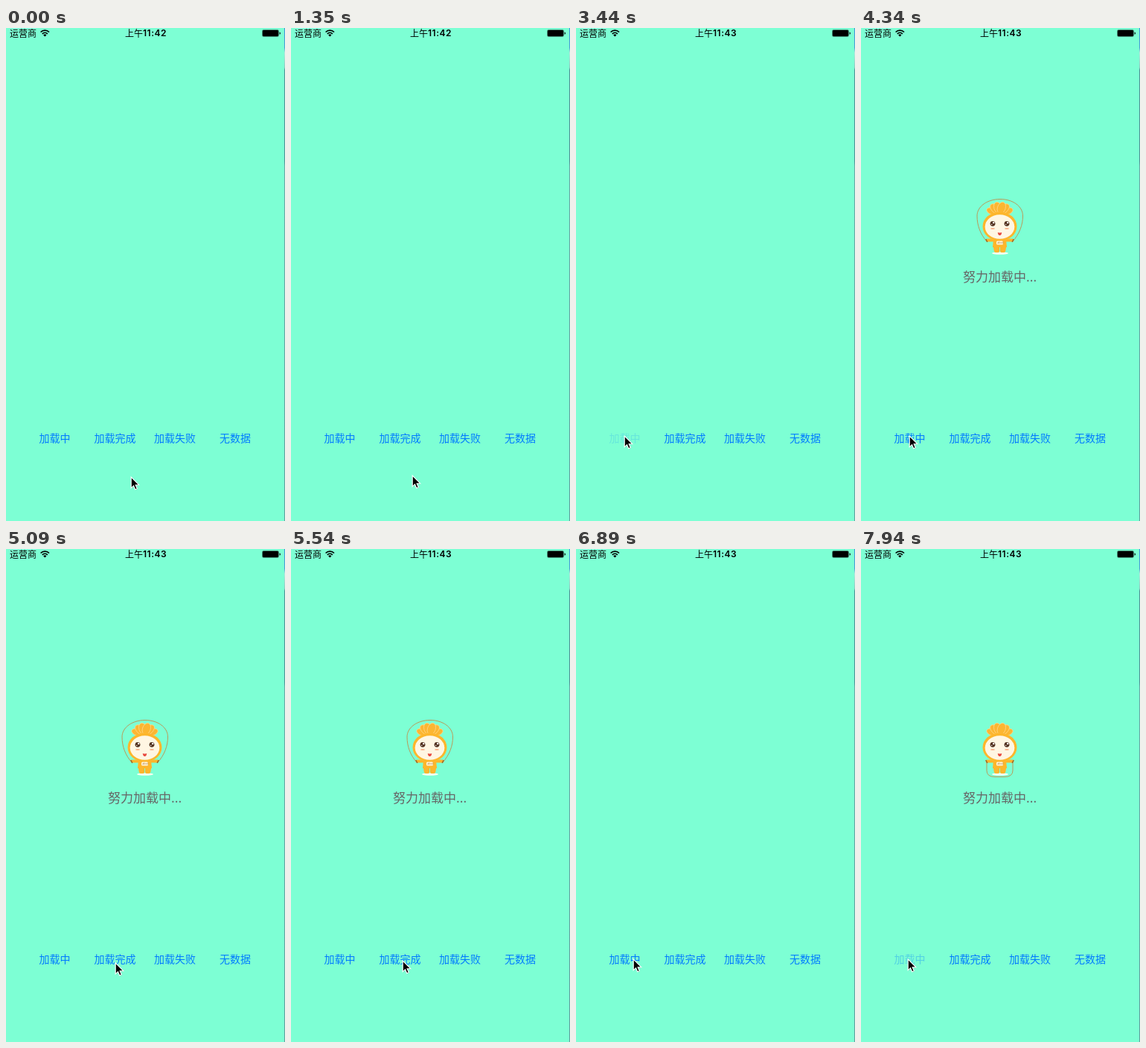
Animation of 375 by 661 pixels, one loop 8 s. Source, as an HTML page:

```html
<!DOCTYPE html>
<html lang="zh">
<head>
<meta charset="utf-8">
<style>
html, body { margin: 0; width: 100%; height: 100%; overflow: hidden; background: #7dffd4; }
svg { display: block; width: 375px; height: 661px; }
text { font-family: "Noto Sans CJK SC", "Noto Sans CJK", sans-serif; }
.btn { font-size: 14px; fill: #007aff; }
.clock { font-size: 12px; font-weight: 500; }
.digits { font: 600 12px Inter, sans-serif; letter-spacing: .5px; }
</style>
</head>
<body>
<svg viewBox="0 0 375 661">
  <defs>
    <linearGradient id="edge" x2="0" y2="1">
      <stop offset="0" stop-color="#3f8fdc"/>
      <stop offset=".04" stop-color="#4a9fd4"/>
      <stop offset=".05" stop-color="#b4e8dc"/>
      <stop offset=".08" stop-color="#8fc8c0"/>
      <stop offset=".085" stop-color="#4f8f94"/>
      <stop offset=".27" stop-color="#4f8f94"/>
      <stop offset=".28" stop-color="#69a5a4"/>
      <stop offset="1" stop-color="#5f9c9c"/>
    </linearGradient>
  </defs>
  <rect width="375" height="661" fill="#7dffd4"/>
  <rect x="374" width="1" height="661" fill="url(#edge)"/>

  <!-- status bar -->
  <text x="5" y="11.6" font-size="12">运营商</text>
  <g fill="none" stroke="#000" stroke-width="1.7">
    <path d="M46.6 5.500a8.200 8.200 0 0 1 11.400 0M48.800 7.900a5 5 0 0 1 7 0"/>
    <path d="M52.3 11.6l-2.1-2.2a3 3 0 0 1 4.200 0z" fill="#000" stroke="none"/>
  </g>
  <text class="clock" x="160" y="11.6">上午</text>
  <text class="digits" id="digits" x="184" y="11.4"></text>
  <rect x="344.5" y="2.5" width="22" height="9" rx="1.8" fill="none" stroke="#000" stroke-opacity=".45"/>
  <rect x="345" y="3" width="21" height="8" rx="1"/>
  <path d="M367.6 5.2q1.4.4 1.4 1.8t-1.4 1.8z"/>

  <g id="loading">
    <ellipse id="shadow" cx="187" fill="#f4fff0"/>
    <path id="rope" fill="none" stroke="#b99a58"/>
    <g id="doll">
      <g id="tuft" fill="#fcb632" stroke="#ffd98a" stroke-width=".8" transform="translate(186.500 249) scale(1 .85)"></g>
      <g fill="#fdb62c">
        <path d="M178 283h17l1 11h-19z"/>
        <path id="legs"/>
        <path d="M179 284.500L169.500 284.500M194 284.500L203.500 284.500" stroke="#fdb62c" stroke-width="4" stroke-linecap="round"/>
      </g>
      <path d="M167.8 283l2 4M205.2 283l-2 4" stroke="#9a6a2c" stroke-width="1.6"/>
      <ellipse cx="186.5" cy="266" rx="23" ry="19.3" fill="#fdb62c"/>
      <ellipse cx="186.5" cy="266.5" rx="19.8" ry="16.3" fill="#fff6e3"/>
      <g id="eyes"></g>
      <path d="M183.8 274q2.700 1 5.400 0q-.3 4-2.700 4t-2.700-4z" fill="#e8473f"/>
      <rect x="182" y="285.5" width="9" height="5" rx="1.5" fill="#fff4dc"/>
      <text id="badge" x="183.3" y="289.4" font-size="3.6" fill="#a8742c">abcd</text>
    </g>
    <text x="137" y="339.5" font-size="17" fill="#666">努力加载中...</text>
  </g>

  <g class="btn">
    <text id="start" x="44.5" y="554.8">加载中</text>
    <text id="done" x="118.5" y="554.8">加载完成</text>
    <text x="199" y="554.8">加载失败</text>
    <text x="287" y="554.8">无数据</text>
  </g>

  <g id="cursor">
    <path d="M1 1.500V15.500l3.200-3 2.300 5 2.600-1.100-2.200-4.900h4.600z" opacity=".18"/>
    <path d="M.2 0V14.800l3.300-3.100 2.200 5.100 2.600-1.100-2.200-5h4.600z" stroke="#fff" stroke-width="1.1"/>
  </g>
</svg>
<script>
const $ = id => document.getElementById(id);
const set = (id, attrs) => {
  for (const k in attrs) $(id).setAttribute(k, attrs[k]);
};

$('tuft').innerHTML = [-68, 68, -38, 38, -14, 14].map(a =>
  `<ellipse cy="-9.5" rx="5.4" ry="9.3" transform="rotate(${a})"/>`).join('');
$('eyes').innerHTML = [177, 196].map(x =>
  `<circle cx="${x}" cy="262.3" r="3.4" fill="#533220"/>
   <circle cx="${x + 1.2}" cy="261" r="1.2" fill="#fff"/>
   <circle cx="${x - 1.3}" cy="263.4" r=".7" fill="#fff"/>
   <ellipse cx="${x}" cy="269" rx="3" ry="1" fill="#f9b48e"/>`).join('');

const standing = 'M177.5 291h8.6v8q0 2-2 2h-3q-2 0-2.3-2zM187 291h8.6l-1.3 8q-.3 2-2.3 2h-3q-2 0-2-2z';
const tucked = 'M177.5 289h9l-2 8q-1.5 3-4 1.5q-3-3-3-9.5zM187 289h8.6q.5 7-2.6 9.5q-3 1.5-4-1.5z';

// rope under the feet, rope overhead, in the air
const poses = [
  { lift: 0, legs: standing, rx: 11, rope: 'M169 286V297Q169 305.5 180 305.5H193Q204 305.5 204 297V286' },
  { lift: 0, legs: standing, rx: 11, rope: 'M169 286C160 276 156 264 156 252C156 239 170 229.5 187 229.5S217.5 239 217.5 252C217.5 264 213 276 204 286' },
  { lift: -8.5, legs: tucked, rx: 7, rope: 'M170 273C163 268 156 259 156 250C156 241 170 237.5 187 237.5S217 241 217 250C217 259 210 268 203 273' }
];

// pointer tip: time, x, y
const path = [
  [1200, 168, 602], [2355, 69, 554], [2690, 65, 547], [4340, 65, 547],
  [5090, 147, 555], [5390, 150, 552], [6440, 150, 552], [7040, 63, 550]
];

function pointer(t) {
  const i = path.findIndex(p => p[0] > t);
  if (i === 0) return path[0].slice(1);
  if (i < 0) return path[path.length - 1].slice(1);
  const a = path[i - 1], b = path[i];
  const u = (t - a[0]) / (b[0] - a[0]), s = u * u * (3 - 2 * u);
  return [a[1] + (b[1] - a[1]) * s, a[2] + (b[2] - a[2]) * s];
}

// a pressed label dims at once, then fades back
const label = (t, down) =>
  t < down || t >= down + 300 ? 1 : t < down + 150 ? 0.18 : 0.6;

function draw(now) {
  const time = now % 8000, base = time < 2240 ? 0 : 2240;
  const t = base + Math.floor((time - base) / 150) * 150;

  $('digits').textContent = t < 1650 ? '11:42' : '11:43';
  set('cursor', { transform: `translate(${pointer(t).map(Math.round)})` });
  set('start', { opacity: t >= 7940 ? 0.35 : label(t, 3440) });
  set('done', { opacity: label(t, 5990) });

  const first = t >= 3700 && t < 6290, again = t >= 7940;
  set('loading', { visibility: first || again ? 'visible' : 'hidden' });
  const age = first ? t - 3700 : 0;
  const pose = poses[Math.floor(age % 400 / 400 * 3)];
  set('doll', { transform: `translate(0 ${pose.lift})` });
  set('legs', { d: pose.legs });
  set('rope', { d: pose.rope });
  set('shadow', { rx: pose.rx, ry: pose.rx / 6, cy: pose.lift ? 300.8 : 302 });
  set('badge', { opacity: pose.lift ? 0 : 1 });
}

const begin = performance.now();
function loop() {
  draw(performance.now() - begin);
  requestAnimationFrame(loop);
}
loop();
</script>
</body>
</html>
```
